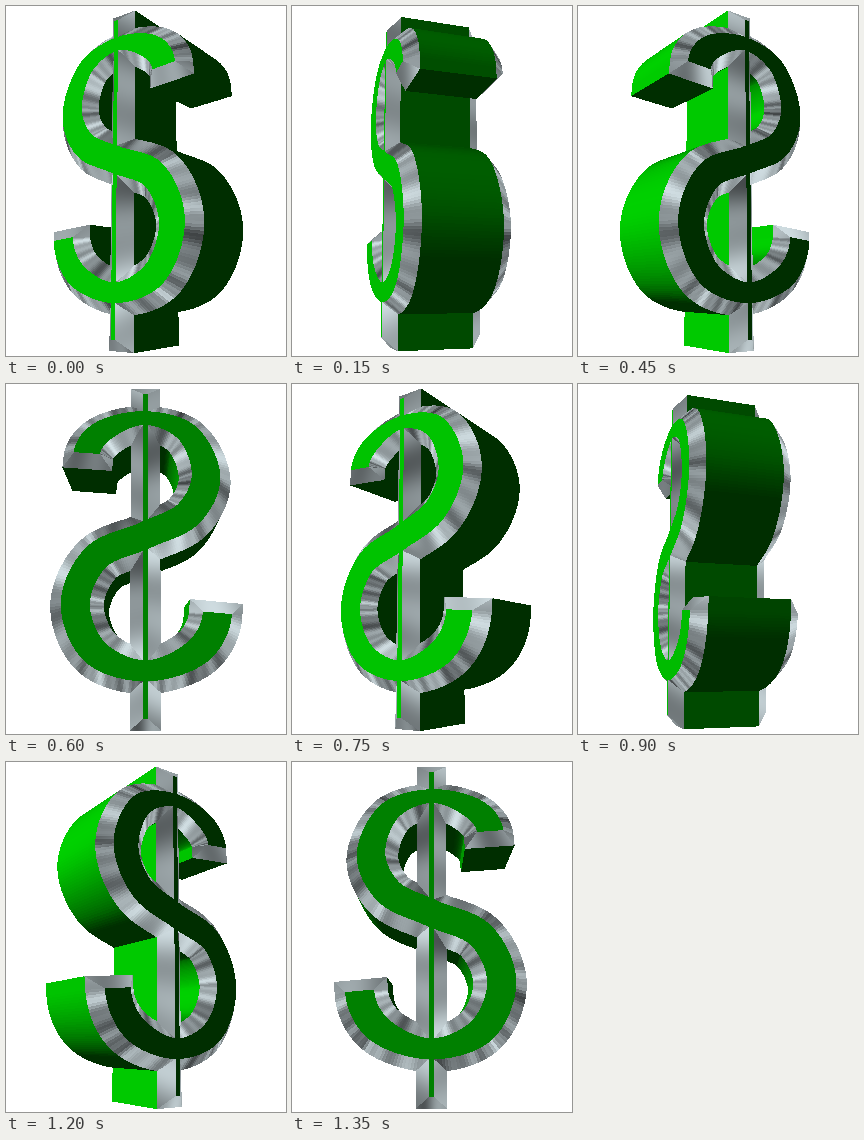
Write an HTML page with a canvas that moves like this. It is 280x350 px and loops after 1500 ms.

```html
<!DOCTYPE html>
<html lang="en">
<head>
<meta charset="utf-8">
<title>Rotating dollar sign</title>
<style>
  html, body { margin: 0; width: 100%; height: 100%; overflow: hidden; background: #fff; }
  canvas { display: block; width: 280px; height: 350px; }
</style>
</head>
<body>
<canvas id="stage" width="280" height="350"></canvas>
<script>
const W = 280, H = 350, CX = 139.5, CY = 173;
const FOCAL = 540, PITCH = 11 * Math.PI / 180;
const DEPTH = 36.5, BEVEL = 11.5, RISE = 12.2;
const STEPS = 10, STEP_MS = 150;
const LIGHT = [-155, -80, 115], SHADOW = 46;

const ctx = document.getElementById('stage').getContext('2d');
const image = ctx.createImageData(W, H);
const zbuf = new Float32Array(W * H);

// Spine of the S: x, y, half width of the green face.
// The first and last points only steer the end tangents.
const SPINE = [
  [43, -58, 12.5], [55.2, -90.4, 12.5], [38.8, -113.7, 11], [0, -125.9, 7],
  [-39.8, -110.4, 10.5], [-56.6, -68.5, 13.3], [-39.7, -31.3, 13.3], [0, -11, 12.8],
  [44.2, 9.1, 13], [62.7, 51.3, 13], [44.7, 94.1, 12], [0, 110.6, 9],
  [-45.7, 94.1, 12], [-64, 60.1, 12.9], [-52.5, 20.4, 12.9]
];

// Catmull-Rom value and slope
function spline(a, b, c, d, t) {
  const k1 = (c - a) / 2, k2 = a - 2.5 * b + 2 * c - d / 2, k3 = (d - a) / 2 + 1.5 * (b - c);
  return [b + t * (k1 + t * (k2 + t * k3)), k1 + t * (2 * k2 + 3 * t * k3)];
}

function sampleSpine(points, perSpan) {
  const out = [];
  const spans = points.length - 3;
  for (let i = 0; i <= spans * perSpan; i++) {
    const s = Math.min(Math.floor(i / perSpan), spans - 1);
    const [x, y, w] = [0, 1, 2].map(k =>
      spline(points[s][k], points[s + 1][k], points[s + 2][k], points[s + 3][k], i / perSpan - s));
    const len = Math.hypot(x[1], y[1]);
    out.push({ x: x[0], y: y[0], w: w[0], tx: x[1] / len, ty: y[1] / len });
  }
  return out;
}

const sub = (a, b) => [a[0] - b[0], a[1] - b[1], a[2] - b[2]];
const dot = (a, b) => a[0] * b[0] + a[1] * b[1] + a[2] * b[2];
const cross = (a, b) => [
  a[1] * b[2] - a[2] * b[1], a[2] * b[0] - a[0] * b[2], a[0] * b[1] - a[1] * b[0]
];

// Unit normal of a quad; null when it has no area
function normalOf(p) {
  const n = cross(sub(p[2], p[0]), sub(p[3], p[1]));
  const len = Math.hypot(...n);
  return len < 1e-6 ? null : n.map(v => v / len);
}

// Eight corners of the bevelled profile; ext pushes the outer corners past an end.
function section(p, ext) {
  const at = (side, edge, z) => {
    const off = side * (p.w + edge * BEVEL), push = edge * ext;
    return [p.x - p.ty * off + p.tx * push, p.y + p.tx * off + p.ty * push, z];
  };
  const top = DEPTH + RISE;
  return [
    at(-1, 1, DEPTH), at(-1, 0, top), at(1, 0, top), at(1, 1, DEPTH),
    at(1, 1, -DEPTH), at(1, 0, -top), at(-1, 0, -top), at(-1, 1, -DEPTH)
  ];
}

const faces = [];
function addFace(metal, ...pts) {
  const normal = normalOf(pts);
  if (normal) faces.push({ metal, pts, normal });
}

function sweep(path) {
  const last = path[path.length - 1];
  const rings = [section(path[0], -BEVEL), ...path.map(p => section(p, 0)), section(last, BEVEL)];
  for (let i = 1; i < rings.length; i++) {
    const a = rings[i - 1], b = rings[i];
    for (let k = 0; k < 8; k++) {
      const m = (k + 1) % 8;
      addFace(k % 2 === 0, a[k], a[m], b[m], b[k]);
    }
  }
  for (const r of [rings[0], rings[rings.length - 1]]) {
    addFace(true, r[0], r[1], r[2], r[3]);
    addFace(true, r[4], r[5], r[6], r[7]);
    addFace(false, r[0], r[3], r[4], r[7]);
  }
}

sweep(sampleSpine(SPINE, 24));
sweep([-150.9, 150.9].map(y => ({ x: 0, y, w: 2.4, tx: 0, ty: 1 })));

// Brushed reflection: streaks run across the bevel
function chrome(n, x, y) {
  const u = n[0] + (x - CX) * 0.0025, v = n[1] + (y - CY) * 0.0025;
  const a = Math.atan2(v, u), r = Math.hypot(u, v);
  const g = 146 + 28 * Math.sin(5 * a + 1) + 26 * Math.sin(13 * a + 3 * r)
    + 20 * Math.sin(29 * a + 2) + 12 * Math.sin(9 * r);
  return [g * 0.94, g, g * 1.02];
}

function fillTriangle(a, b, c, shade) {
  const area = (b[0] - a[0]) * (c[1] - a[1]) - (b[1] - a[1]) * (c[0] - a[0]);
  if (Math.abs(area) < 1e-4) return;
  const x0 = Math.max(0, Math.floor(Math.min(a[0], b[0], c[0])));
  const x1 = Math.min(W - 1, Math.ceil(Math.max(a[0], b[0], c[0])));
  const y0 = Math.max(0, Math.floor(Math.min(a[1], b[1], c[1])));
  const y1 = Math.min(H - 1, Math.ceil(Math.max(a[1], b[1], c[1])));
  for (let y = y0; y <= y1; y++) {
    for (let x = x0; x <= x1; x++) {
      const px = x + 0.5, py = y + 0.5;
      const wb = ((px - a[0]) * (c[1] - a[1]) - (py - a[1]) * (c[0] - a[0])) / area;
      const wc = ((b[0] - a[0]) * (py - a[1]) - (b[1] - a[1]) * (px - a[0])) / area;
      const wa = 1 - wb - wc;
      if (wa < -1e-6 || wb < -1e-6 || wc < -1e-6) continue;
      const z = wa * a[2] + wb * b[2] + wc * c[2], i = y * W + x;
      if (z <= zbuf[i]) continue;
      zbuf[i] = z;
      image.data.set(shade(px, py), i * 4);
    }
  }
}

function render(angle) {
  const cos = Math.cos(angle), sin = Math.sin(angle);
  const cp = Math.cos(PITCH), sp = Math.sin(PITCH);
  // Spin about the upright axis, then lean the top away from the eye.
  const turn = ([x, y, z]) => {
    const far = x * sin + z * cos;
    return [x * cos - z * sin, y * cp - far * sp, far * cp + y * sp];
  };
  const project = ([x, y, z]) => {
    const q = 1 / (FOCAL - z);
    return [CX + x * FOCAL * q, CY + y * FOCAL * q, q];
  };
  image.data.fill(255);
  zbuf.fill(0);
  for (const { metal, pts, normal } of faces) {
    const turned = pts.map(turn), n = turn(normal);
    const facing = dot(n, sub([0, 0, FOCAL], turned[0])) < 0 ? -1 : 1;
    const paint = [0, Math.max(SHADOW, facing * dot(n, LIGHT)), 0];
    const shade = metal ? (x, y) => chrome(normal, x, y) : () => paint;
    const [a, b, c, d] = turned.map(project);
    fillTriangle(a, b, c, shade);
    fillTriangle(a, c, d, shade);
  }
  ctx.putImageData(image, 0, 0);
}

let shown = -1;
function tick() {
  const step = Math.floor(performance.now() / STEP_MS) % STEPS;
  if (step !== shown) {
    shown = step;
    render((step + 1) * 2 * Math.PI / STEPS);
  }
  requestAnimationFrame(tick);
}
tick();
</script>
</body>
</html>
```
